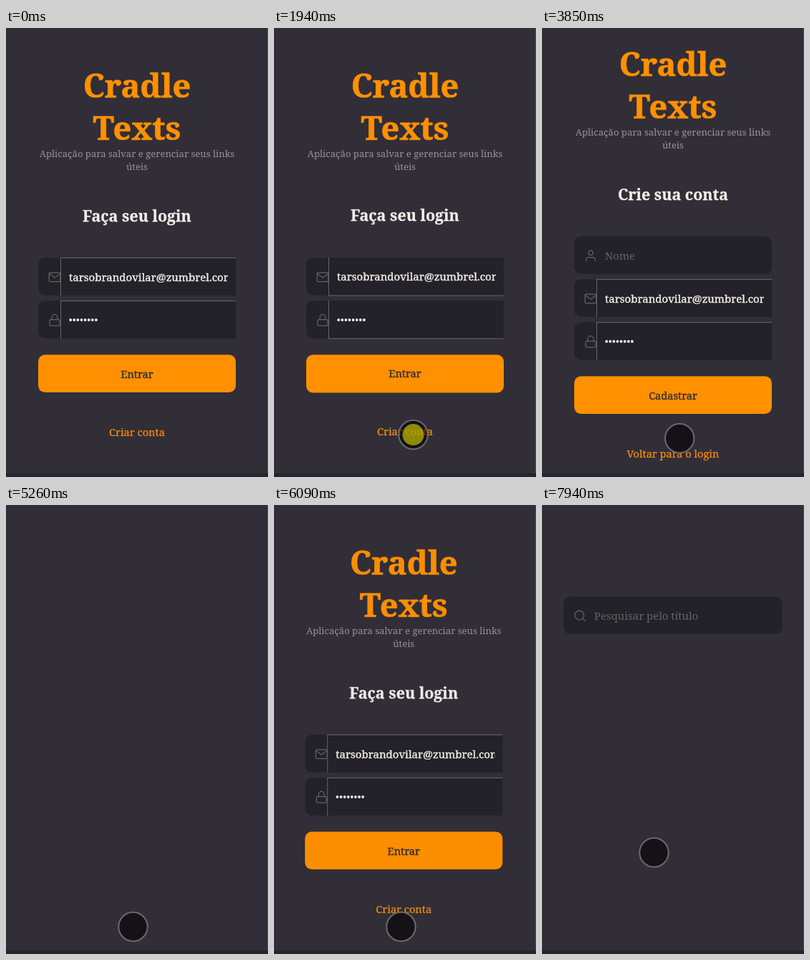
Animation, 366 px wide and 626 px high, one loop 8 s. Source, as an HTML page:

```html
<!DOCTYPE html>
<html lang="pt-BR">
<head>
<meta charset="utf-8">
<title>Login</title>
<style>
  html, body { margin: 0; width: 100%; height: 100%; overflow: hidden; background: #312e38; }
  #stage { display: block; width: 100%; height: 100%; }
  text {
    font-family: "Roboto Slab", "Noto Serif", serif; font-size: 14.6px;
    color: #f4ede8; fill: currentColor; stroke: currentColor; stroke-width: 0;
  }
  .center { text-anchor: middle; }
  .title { font-size: 45px; font-weight: 700; color: #ff9000; stroke-width: .7; }
  .tagline { font-size: 13.1px; color: #999591; }
  .heading { font-size: 21.4px; font-weight: 700; stroke-width: .3; }
  .value { font-size: 15px; stroke-width: .4; }
  .hint { font-size: 14.9px; color: #666360; }
  .action { color: #312e38; stroke-width: .4; }
  .link { color: #ff9000; stroke-width: .2; }
  .box { fill: #232129; }
  .button { fill: #ff9000; }
  .icon { fill: none; stroke: #666360; stroke-width: 1.6; stroke-linecap: round; stroke-linejoin: round; }
  .edge { fill: none; stroke: #68656a; }
  .low, .nudged .high { display: none; }
  .nudged .low { display: inline; }
  .nudged .heading, .nudged .value, .nudged .action, .nudged .link { transform: translateY(-.7px); }
  .nudged .button { height: 53px; }
</style>
</head>
<body>
<svg id="stage" viewBox="0 0 366 626"></svg>
<script>
const LOOP = 8000, STEP = 70;
const EMAIL = 'tarsobrandovilar@zumbrel.com';

const ICONS = {
  mail: '<rect x="2" y="4" width="20" height="16" rx="2"/><path d="M22 6l-10 7L2 6"/>',
  lock: '<rect x="3" y="11" width="18" height="11" rx="2"/><path d="M7 11V7a5 5 0 0 1 10 0v4"/>',
  user: '<path d="M20 21v-2a4 4 0 0 0-4-4H8a4 4 0 0 0-4 4v2"/><circle cx="12" cy="7" r="4"/>',
  search: '<circle cx="11" cy="11" r="8"/><path d="M21 21l-4.35-4.35"/>'
};

const label = (cls, y, text, x = 183) =>
  `<text class="${cls}${x === 183 ? ' center' : ''}" x="${x}" y="${y}">${text}</text>`;
const icon = (name, x, y) =>
  `<g class="icon" transform="translate(${x - 9.4} ${y - 9.4}) scale(.785)">${ICONS[name]}</g>`;
const box = (x, y, width, cls = 'box') =>
  `<rect class="${cls}" x="${x}" y="${y}" width="${width}" height="52.5" rx="9.4"/>`;

const emptyField = (name, hint, x, y, width) =>
  box(x, y, width) + icon(name, x + 23, y + 27) + label('hint', y + 32.5, hint, x + 43);

const filledField = (name, y, content) =>
  box(45, y + .3, 270) + icon(name, 68, y + 27.3) +
  `<rect class="box" x="76" y="${y}" width="245" height="53"/>
   <path class="edge" d="M76.5 ${y}v53"/>
   <path class="edge high" d="M76 ${y + .5}h245"/>
   <path class="edge low" d="M76 ${y + 53}h245"/>` + content;

const emailText = y =>
  `<svg x="88" y="${y}" width="222" height="53"><text class="value" y="33">${EMAIL}</text></svg>`;
const passwordDots = y => Array.from({ length: 8 }, (_, i) =>
  `<circle cx="${90.2 + i * 5.1}" cy="${y + 27}" r="1.9" fill="#f4ede8"/>`).join('');

// `top` lifts the header, `bottom` moves the fields, button and link.
function formPage(id, top, bottom, heading, action, link, extraField = '') {
  const email = 320 + bottom, password = 380 + bottom;
  return `<g id="${id}">` +
    label('title', 96.5 + top, 'Cradle') + label('title', 155.5 + top, 'Texts') +
    label('tagline', 180 + top, 'Aplicação para salvar e gerenciar seus links') +
    label('tagline', 198 + top, 'úteis') +
    label('heading', 270 + top, heading) + extraField +
    filledField('mail', email, emailText(email)) +
    filledField('lock', password, passwordDots(password)) +
    box(45, 455.5 + bottom, 276, 'button') +
    label('action', 488 + bottom, action) + label('link', 569 + bottom, link) + '</g>';
}

const stage = document.getElementById('stage');
stage.innerHTML =
  '<rect width="366" height="626" fill="#312e38"/>' +
  formPage('login', 0, 0, 'Faça seu login', 'Entrar', 'Criar conta') +
  formPage('signup', -30, 30, 'Crie sua conta', 'Cadastrar', 'Voltar para o login',
    emptyField('user', 'Nome', 45, 290.5, 276)) +
  `<g id="search">${emptyField('search', 'Pesquisar pelo título', 30, 127.5, 306)}</g>
   <rect y="621" width="366" height="5" fill="#26242c"/>
   <rect x="365" width="1" height="621" fill="#4d4a53"/>
   <g id="cursor">
     <circle r="20.5" fill="#000" fill-opacity=".6"/>
     <circle r="20.2" fill="none" stroke="#6b696d" stroke-width="2"/>
     <circle id="press" r="15" fill="#fffa00" fill-opacity=".52"/>
   </g>`;

const [login, signup, search, cursor, press] =
  ['login', 'signup', 'search', 'cursor', 'press'].map(id => document.getElementById(id));

const within = (t, from, to) => t >= from && t < to;
const show = (element, visible) => element.setAttribute('visibility', visible ? 'visible' : 'hidden');

// CSS "ease": cubic-bezier(.25, .1, .25, 1)
function ease(x) {
  if (x <= 0 || x >= 1) return x <= 0 ? 0 : 1;
  let low = 0, high = 1;
  for (let i = 0; i < 20; i++) {
    const s = (low + high) / 2;
    if (.75 * s * (1 - s) + s ** 3 < x) low = s; else high = s;
  }
  return .3 * low * (1 - low) ** 2 + 3 * low ** 2 * (1 - low) + low ** 3;
}

// Slides a page in from 113 px aside while it fades in.
function enter(page, t, first, delay, side) {
  const stepped = Math.floor((t - first) / STEP) * STEP;
  const p = t < first ? 1 : ease((stepped - delay) / 820);
  page.setAttribute('transform', `translate(${side * 113 * (1 - p)} 0)`);
  page.setAttribute('opacity', p);
}

const moves = [
  { at: 850, steps: 10, step: 76.7, path: [[212, 648], [204, 600], [194.5, 567]] },
  { at: 3850, steps: 6, step: STEP, path: [[194.5, 567], [188, 583], [177.5, 588]] },
  { at: 6360, steps: 12, step: STEP, path: [[177.5, 588], [88.5, 518], [156.5, 484.5]] }
];

function cursorAt(t) {
  const move = moves.filter(m => t >= m.at).pop();
  if (!move) return [212, 660];
  const u = Math.min(1, (Math.floor((t - move.at) / move.step) + 1) / move.steps);
  const [a, b, c] = move.path;
  return [0, 1].map(i => (1 - u) ** 2 * a[i] + 2 * u * (1 - u) * b[i] + u * u * c[i]);
}

function draw(t) {
  const onSignup = within(t, 2610, 5260), onSearch = t >= 7940;
  show(signup, onSignup);
  show(search, onSearch);
  show(login, !onSignup && !onSearch);
  enter(signup, t, 2610, 20, 1);
  enter(login, t, 5260, 82, -1);

  stage.classList.toggle('nudged',
    within(t, 850, 2210) || within(t, 3920, 4860) || within(t, 6360, 7940));
  cursor.setAttribute('transform', `translate(${cursorAt(t)})`);
  show(press, within(t, 1940, 2210) || within(t, 4660, 4860) || within(t, 7400, 7670));
}

const start = performance.now();
function tick() {
  draw((performance.now() - start) % LOOP);
  requestAnimationFrame(tick);
}
tick();
</script>
</body>
</html>
```
